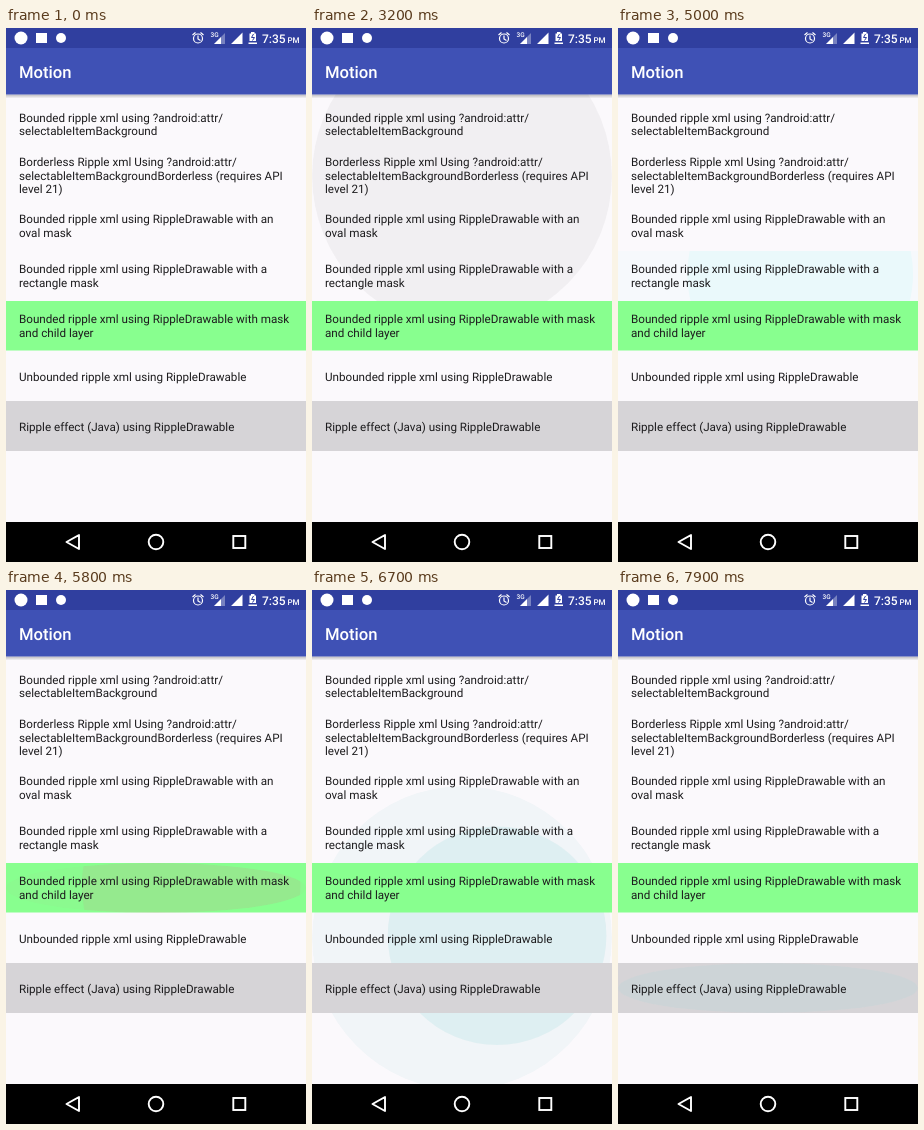
Animation of 300 by 534 pixels, one loop 8 s. Source, as an HTML page:

```html
<!DOCTYPE html>
<html>
<head>
<meta charset="utf-8">
<style>
  html, body { margin: 0; width: 100%; height: 100%; overflow: hidden; background: #fbf9fc; }
  svg { display: block; width: 300px; height: 534px; }
  text { font: 11.67px Roboto, sans-serif; fill: #1c1b1d; text-rendering: geometricPrecision; }
  .light { fill: #fff; font-weight: 500; }
  .line { fill: none; stroke: #fff; }
</style>
</head>
<body>
<svg viewBox="0 0 300 534">
  <defs>
    <linearGradient id="shade" x2="0" y2="1">
      <stop stop-color="#000" stop-opacity=".25"/>
      <stop offset="1" stop-color="#000" stop-opacity="0"/>
    </linearGradient>
  </defs>
  <rect width="300" height="534" fill="#fbf9fc"/>
  <g id="under"></g>
  <rect y="273" width="300" height="49.500" fill="#88ff8f"/>
  <rect y="373" width="300" height="50" fill="#d6d4d7"/>
  <g id="over"></g>
  <g id="labels"></g>

  <rect y="66.500" width="300" height="4" fill="url(#shade)"/>
  <rect width="300" height="66.500" fill="#3f51b5"/>
  <rect width="300" height="20" fill="#303f9f"/>
  <text class="light" x="13" y="50" style="font-size:16.67px">Motion</text>

  <g fill="#fff">
    <circle cx="15" cy="10" r="6.5"/>
    <rect x="30" y="5" width="11" height="10"/>
    <circle cx="55" cy="10" r="5"/>
    <path d="M208 16L219 5V16Z" opacity=".35"/>
    <path d="M208 16L215 9V16ZM225 16L236.500 4.500V16Z"/>
    <path d="M243.500 5.500H245V4H248.500V5.500H250V13H243.500ZM242.500 14.500H251V16H242.500Z"/>
  </g>
  <path d="M247.500 6L245.500 9.500H248.500L246.500 12.500" class="line" style="stroke:#303f9f"/>
  <g class="line" stroke-width="1.2">
    <circle cx="192" cy="10.500" r="4.500"/>
    <path d="M192 7.500V11L194.500 12.500M186.500 7L189.500 4.500M197.500 7L194.500 4.500"/>
  </g>
  <text class="light" x="204.500" y="9" style="font-size:6.500px">3G</text>
  <text class="light" x="256" y="14.500" style="font-size:12px">7:35</text>
  <text class="light" x="281.500" y="14.500" style="font-size:8px">PM</text>

  <rect y="494" width="300" height="40"/>
  <g class="line" stroke-width="1.9">
    <path d="M73 507V521L60.500 514Z" stroke-linejoin="round"/>
    <circle cx="150" cy="514" r="7.300"/>
    <rect x="227.300" y="508" width="12" height="12"/>
  </g>
</svg>
<script>
const byId = id => document.getElementById(id);

function add(parent, tag, attrs) {
  const el = document.createElementNS('http://www.w3.org/2000/svg', tag);
  for (const key in attrs) el.setAttribute(key, attrs[key]);
  return parent.appendChild(el);
}

// first baseline, then the lines of each item
const items = [
  [93.5, 'Bounded ripple xml using ?android:attr/', 'selectableItemBackground'],
  [138, 'Borderless Ripple xml Using ?android:attr/', 'selectableItemBackgroundBorderless (requires API', 'level 21)'],
  [195.3, 'Bounded ripple xml using RippleDrawable with an', 'oval mask'],
  [245.3, 'Bounded ripple xml using RippleDrawable with a', 'rectangle mask'],
  [295.3, 'Bounded ripple xml using RippleDrawable with mask', 'and child layer'],
  [352.7, 'Unbounded ripple xml using RippleDrawable'],
  [402.5, 'Ripple effect (Java) using RippleDrawable']
];
for (const [y, ...lines] of items)
  lines.forEach((line, i) => {
    add(byId('labels'), 'text', { x: 13, y: y + i * 13.7 }).textContent = line;
  });

// grow: time to full radius; fade: length of the fade before the end
const ripples = [
  { start: 1100, end: 1800, grow: 400, fade: 200, mask: 'rect', color: '#000', wave: .07, back: .05 },
  { start: 2500, end: 3300, grow: 700, fade: 300, mask: 'none', color: '#000', wave: .07, back: .05 },
  { start: 3600, end: 4300, grow: 900, fade: 200, mask: 'oval', color: '#ff4081', wave: .17, back: .06 },
  { start: 4500, end: 5400, grow: 840, fade: 400, mask: 'rect', color: '#00f0e0', wave: .05, back: .02 },
  { start: 5400, end: 6300, grow: 700, fade: 600, mask: 'oval', color: '#ff4081', wave: .1, back: .03 },
  { start: 6300, end: 7100, grow: 700, fade: 300, mask: 'none', color: '#00a0a0', wave: .08, back: .04 },
  { start: 7200, end: 8000, grow: 700, fade: 400, mask: 'oval', color: '#00e0cc', wave: .12, back: .037 }
];
const RADIUS = 152, TOUCH_X = 275;
const clamp = v => Math.max(0, Math.min(1, v));

function addMask(parent, kind, cy, attrs) {
  if (kind === 'rect') return add(parent, 'rect', { y: cy - 25, width: 300, height: 50, ...attrs });
  const ry = kind === 'oval' ? 25 : RADIUS;
  return add(parent, 'ellipse', { cx: 150, cy, rx: 150, ry, ...attrs });
}

ripples.forEach((r, i) => {
  const cy = r.cy = 98 + 50 * i;
  addMask(add(document.querySelector('defs'), 'clipPath', { id: 'mask' + i }), r.mask, cy);
  r.group = add(byId(r.mask === 'none' ? 'under' : 'over'), 'g', { fill: r.color, 'clip-path': `url(#mask${i})` });
  r.backEl = addMask(r.group, r.mask, cy);
  r.waveEl = add(r.group, 'circle', {});
});

function draw(now) {
  const time = Math.floor(now % 8000 / 100) * 100;
  for (const r of ripples) {
    const age = time - r.start;
    const active = age > 0 && time < r.end;
    r.group.style.display = active ? '' : 'none';
    if (!active) continue;
    const fade = clamp((r.end - time) / r.fade);
    const p = 1 - (1 - clamp(age / r.grow)) ** 1.5;
    r.backEl.setAttribute('opacity', r.back * fade);
    r.waveEl.setAttribute('opacity', r.wave * fade * clamp((age - 100) / 200));
    r.waveEl.setAttribute('cx', TOUCH_X + (150 - TOUCH_X) * p);
    r.waveEl.setAttribute('cy', r.cy - 8 * (1 - p));
    r.waveEl.setAttribute('r', RADIUS * p);
  }
}

let origin;
function tick(now) {
  origin ??= now;
  draw(now - origin);
  requestAnimationFrame(tick);
}
draw(0);
requestAnimationFrame(tick);
</script>
</body>
</html>
```
